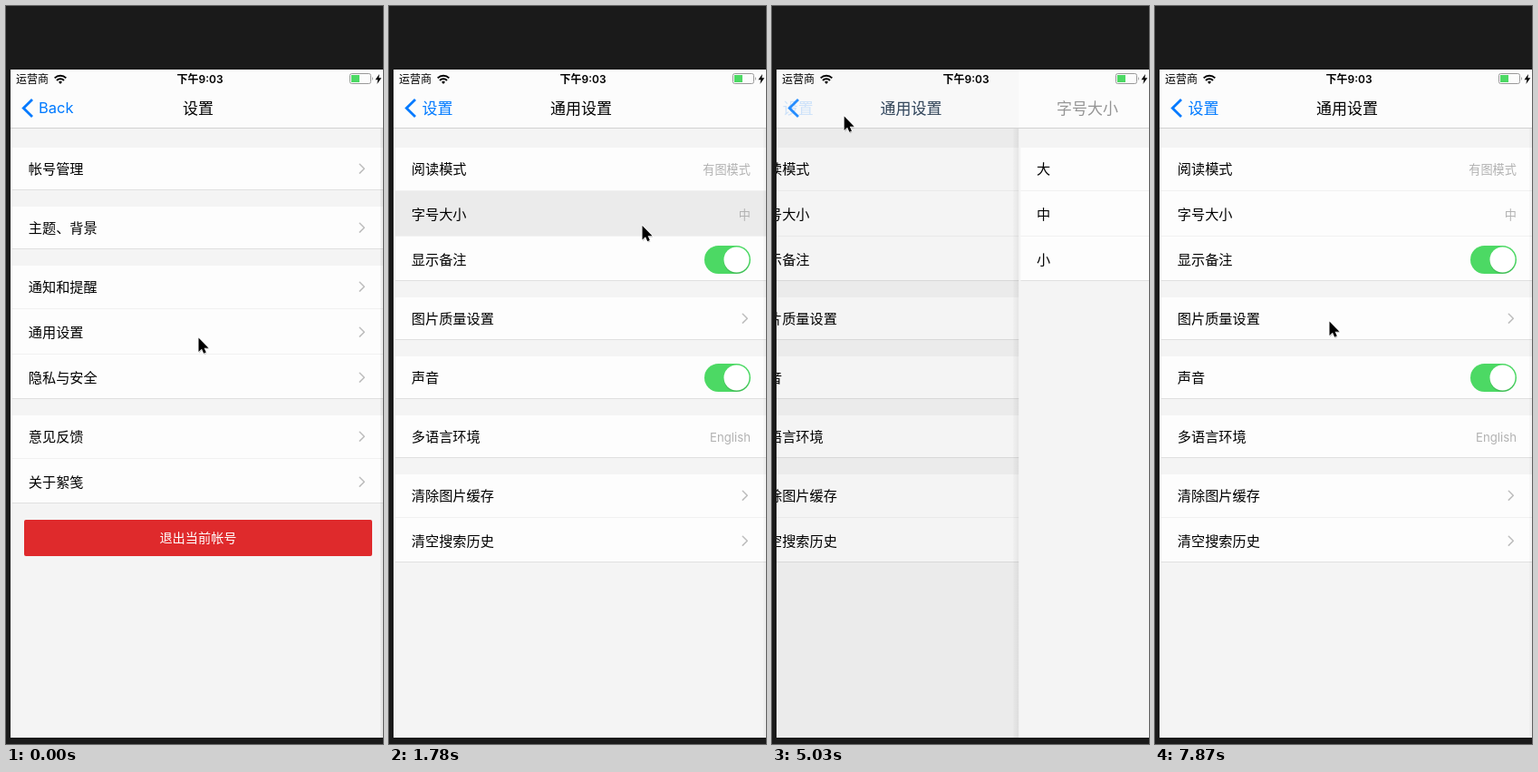
Recreate the animation shown at these times as an HTML page. Size 416x813 px, loop 8 s.

```html
<!DOCTYPE html>
<html lang="zh-CN">
<head>
<meta charset="utf-8">
<title>设置</title>
<style>
  html, body { margin: 0; width: 100%; height: 100%; overflow: hidden; background: #1a1a1a; }
  svg { display: block; width: 416px; height: 813px; }
  text { font-family: "Noto Sans CJK SC", "Noto Sans CJK", sans-serif; fill: #000; }
  .latin { font-family: Inter, "Noto Sans CJK SC", "Noto Sans CJK", sans-serif; }
  .label { font-size: 15.2px; font-weight: 500; }
  .value { font-size: 13.2px; fill: #b2b2b2; text-anchor: end; }
  .title { font-size: 17px; font-weight: 500; text-anchor: middle; }
  .back { font-size: 17px; fill: #007aff; text-anchor: middle; }
  .status { font-size: 12px; }
  .line { fill: none; stroke-linecap: round; stroke-linejoin: round; }
</style>
</head>
<body>
<svg viewBox="0 0 416 813">
  <defs>
    <clipPath id="screen"><rect x="5" y="70" width="411" height="736"/></clipPath>
    <linearGradient id="edge">
      <stop offset="0" stop-opacity=".02"/>
      <stop offset="1" stop-opacity=".06"/>
    </linearGradient>
  </defs>
  <rect width="416" height="813" fill="#1a1a1a"/>
  <g clip-path="url(#screen)">
    <g id="pages"></g>
    <rect x="5" y="70" width="414" height="64" fill="#fcfcfc"/>
    <rect id="navDim" x="5" y="70" height="64"/>
    <rect x="5" y="134" width="414" height="1" fill="#d2d2d2"/>
    <g id="nav"></g>
    <path id="chevron" d="M29 103L19.3 112.5L29 122" class="line" stroke="#007aff" stroke-width="2.8" style="stroke-linecap:butt;stroke-linejoin:miter"/>
    <text x="11" y="85" class="status">运营商</text>
    <g class="line" stroke="#000" stroke-width="2" style="stroke-linecap:butt">
      <path d="M53.7 79.4a8.9 8.9 0 0 1 12.6 0M56 82a5.7 5.7 0 0 1 8 0"/>
      <path d="M58 83.8a2.8 2.8 0 0 1 4 0L60 86z" fill="#000" stroke="none"/>
    </g>
    <text x="214" y="84.5" class="status latin" text-anchor="middle" font-weight="600">下午9:03</text>
    <rect x="379.5" y="74.5" width="23" height="11" rx="2" fill="none" stroke="#999"/>
    <rect x="381" y="76" width="9" height="8" fill="#4cd964"/>
    <path d="M404 78q2 2 0 4z" fill="#999"/>
    <path d="M412 75L407.5 81.3H410.4L409.4 86L414.3 79.2H411.4z"/>
    <g id="cursor">
      <path d="M0 0V15.5L3.5 12.2L5.7 17.2L8.3 16.1L6.1 11.2H11z" transform="translate(.6 1.4)" opacity=".25"/>
      <path d="M0 0V15.5L3.5 12.2L5.7 17.2L8.3 16.1L6.1 11.2H11z" stroke="#fff" stroke-width="1.2" paint-order="stroke"/>
    </g>
  </g>
</svg>
<script>
const $ = id => document.getElementById(id);
const WIDTH = 414, LOOP = 8000, STEP = 148.1, PUSH = 540;

const rect = (x, y, w, h, fill, more = '') =>
  `<rect x="${x}" y="${y}" width="${w}" height="${h}" fill="${fill}" ${more}/>`;
const text = (x, y, cls, str, more = '') => `<text x="${x}" y="${y}" class="${cls}" ${more}>${str}</text>`;

// Row accessories, drawn around the row's centre line
const arrow = y => `<path d="M390.3 ${y - 4.7}l5 4.9l-5 4.9" class="line" stroke="#bdbdbd" stroke-width="1.5"/>`;
const toggle = y => rect(348, y - 15, 51, 31, '#4cd964', 'rx="15.5"') +
  `<circle cx="383.5" cy="${y + 2}" r="14" opacity=".12"/><circle cx="383.5" cy="${y + .5}" r="14" fill="#fff"/>`;
const value = (str, cls = '') => y => text(399, y + 5.5, 'value ' + cls, str);
const check = y => `<path id="check" d="M384 ${y + .8}l4.7 4.7l9.4 -9.8" class="line" stroke="#bfbfbf" stroke-width="2"/>`;
const none = () => '';

const pages = [
  { title: '设置', back: 53.5, tapped: '通用设置', groups: [
    [['帐号管理', arrow]],
    [['主题、背景', arrow]],
    [['通知和提醒', arrow], ['通用设置', arrow], ['隐私与安全', arrow]],
    [['意见反馈', arrow], ['关于絮笺', arrow]]] },
  { title: '通用设置', back: 69, tapped: '字号大小', groups: [
    [['阅读模式', value('有图模式')], ['字号大小', value('中')], ['显示备注', toggle]],
    [['图片质量设置', arrow]],
    [['声音', toggle]],
    [['多语言环境', value('English', 'latin')]],
    [['清除图片缓存', arrow], ['清空搜索历史', arrow]]] },
  { title: '字号大小', back: 69, groups: [
    [['大', none], ['中', check], ['小', none]]] }
];

function drawPage(page, i) {
  let y = 156;
  let out = rect(-1, 70, 6, 736, 'url(#edge)') + rect(5, 70, WIDTH, 736, '#f4f4f4');
  for (const group of page.groups) {
    const h = group.length * 50 - 3;
    out += rect(7, y, WIDTH - 2, h, '#fdfdfd');
    group.forEach(([label, extra], n) => {
      const mid = y + 23 + n * 50;
      if (label === page.tapped)
        out += rect(7, mid - 26, WIDTH - 2, 50, '#ebebeb', `id="tap${i}"`);
      if (n) out += rect(7, mid - 26, WIDTH - 2, 1, '#f1f1f1');
      out += text(24.8, mid + 5.8, 'label', label) + extra(mid);
    });
    out += rect(7, y + h - 1, WIDTH - 2, 1, '#e0e0e0');
    y += h + 18;
  }
  if (i === 0)
    out += rect(20, 566, 384, 40, '#df2a2c', 'rx="2"') +
      text(212, 591.3, '', '退出当前帐号', 'font-size="14.2" text-anchor="middle" style="fill:#fff"');
  return `<g id="page${i}">${out}${rect(5, 70, WIDTH, 736, '#000', `id="dim${i}"`)}</g>`;
}

$('pages').innerHTML = pages.map(drawPage).join('');
$('nav').innerHTML = text(55.3, 118, 'back latin', 'Back', 'id="root" style="font-size:16.5px"') +
  pages.map((p, i) => text(0, 118.5, 'back', p.title, `id="back${i}"`) +
    text(0, 118.5, 'title', p.title, `id="title${i}"`)).join('');

// cubic-bezier(.32, .72, 0, 1)
function ease(x) {
  if (x <= 0) return 0;
  if (x >= 1) return 1;
  let lo = 0, hi = 1;
  for (let n = 0; n < 24; n++) {
    const u = (lo + hi) / 2;
    if (.96 * u * (1 - u) ** 2 + u ** 3 < x) lo = u; else hi = u;
  }
  return 2.16 * lo * (1 - lo) ** 2 + 3 * (1 - lo) * lo ** 2 + lo ** 3;
}
const run = (t, start) => ease((t - start) / PUSH);
const warp = (s, a, b) => s + a * s * (1 - s) * (b - s);

// Cursor stops: time, x, y
const path = [
  [0, 212.5, 365.5], [592, 212.5, 364], [740, 217, 340], [889, 226.5, 302.5], [1040, 256, 281],
  [1185, 279, 266], [1333, 279.5, 250], [1481, 279.5, 242], [1777, 279.5, 242], [2080, 286, 233],
  [2370, 293, 219.5], [2665, 286, 186], [2960, 280, 178], [3110, 278, 185], [3400, 262, 277],
  [3550, 258, 279], [3850, 250, 236], [4000, 248, 233], [4450, 150, 170], [4740, 42, 112],
  [4929, 42, 112], [5035, 79.5, 121.5], [5330, 205, 206], [5480, 232.5, 221.5], [5924, 232.5, 221.5],
  [6070, 232, 218], [6368, 200.5, 191.5], [6810, 52, 112], [6990, 42, 110], [7120, 48, 122],
  [7420, 120, 262], [7700, 181, 356.5], [7849, 192.5, 347.5], [8000, 196, 345]
];
function cursorAt(t) {
  const i = path.findIndex(p => p[0] > t), a = path[i - 1], b = path[i];
  const k = (t - a[0]) / (b[0] - a[0]);
  return [a[1] + (b[1] - a[1]) * k, a[2] + (b[2] - a[2]) * k];
}

const fade = (id, o) => $(id).setAttribute('opacity', o);
const move = (id, x, y = 0) => $(id).setAttribute('transform', `translate(${x} ${y})`);
const within = (t, a, b) => t >= a && t < b;

function render(t) {
  // Share of its width by which each page is still off to the right
  const general = 1 - run(t, 172);
  const size = 1 - run(t, 1803) + run(t, 4929) - run(t, 5800) + run(t, 6990);
  const off = [0, general, size, 1];

  pages.forEach((p, i) => {
    const s = off[i], r = off[i + 1], later = i < 2 ? off[i + 2] : 1;
    move('page' + i, WIDTH * s - .3 * WIDTH * (1 - r));
    fade('dim' + i, .1 * (1 - r));
    const x = p.back + (212 - p.back) * warp(r, 1.114, .434);
    move('title' + i, x + 207 * warp(s, .817, .704));
    fade('title' + i, (1 - s ** 1.2) * r);
    move('back' + i, x - 70 * (1 - later));
    fade('back' + i, (1 - r) * later ** 4);
  });
  move('root', -70 * (1 - general));
  fade('root', general ** 4);

  const s = general > 0 ? general : size;
  $('navDim').setAttribute('width', WIDTH * s);
  fade('navDim', .045 * (1 - s));
  fade('chevron', 1 - .7 * s * (1 - s));

  fade('tap0', +within(t, 140, 900));
  fade('tap1', +(within(t, 1770, 2400) || within(t, 5770, 6400)));
  move('check', 0, within(t, 2955, 3400) ? -50 : within(t, 3400, 3850) ? 50 : 0);
  move('cursor', ...cursorAt(t));
}

function tick() {
  const t = performance.now() % LOOP;
  render(Math.min(53, Math.floor((t + 15) / 148.3)) * STEP);
  requestAnimationFrame(tick);
}
tick();
</script>
</body>
</html>
```
